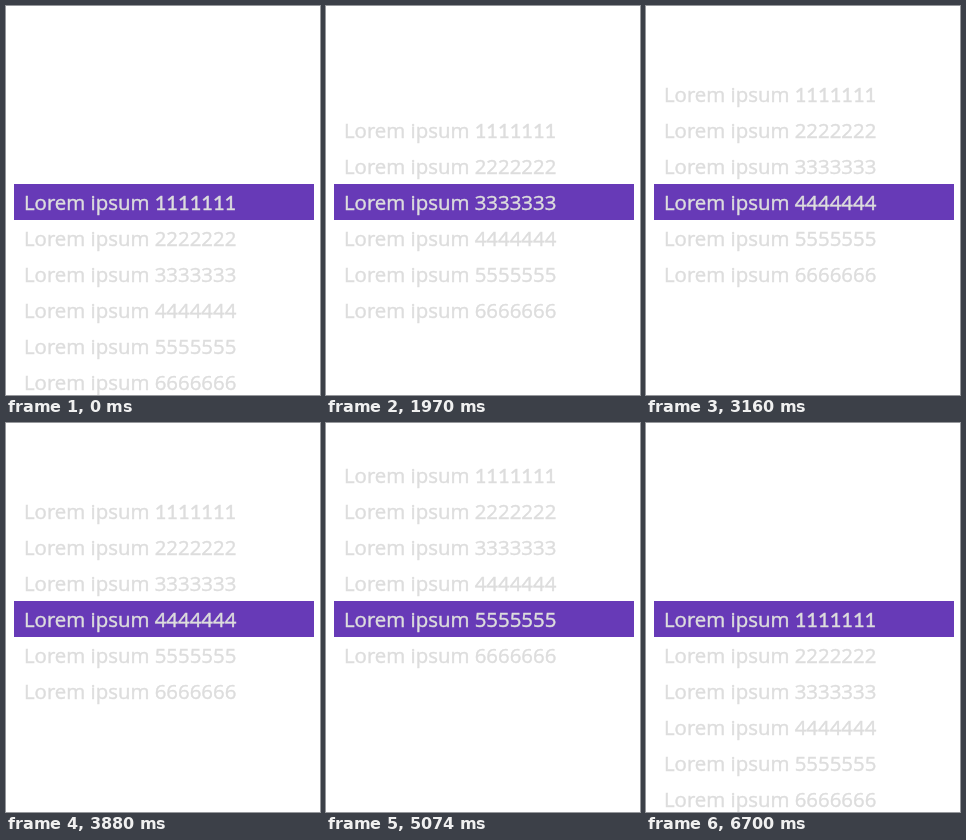
An HTML page that plays this animation: 314x389 px, repeating every 7.04 s.

```html
<!DOCTYPE html>
<html lang="la">
<head>
<meta charset="utf-8">
<title>Lorem ipsum list</title>
<style>
  html, body {
    margin: 0;
    width: 100%;
    height: 100%;
    overflow: hidden;
    background: #fff;
  }
  .stage {
    position: relative;
    width: 314px;
    height: 389px;
    overflow: hidden;
  }
  .bar {
    position: absolute;
    left: 8px;
    top: 178px;
    width: 300px;
    height: 36px;
    background: #673ab7;
  }
  .list {
    position: absolute;
    left: 18px;
    top: 178px;
    margin: 0;
    padding: 0;
    list-style: none;
    color: #ddd;
    font: 20.4px/36px "Open Sans", "Noto Sans", sans-serif;
    -webkit-text-stroke: 0.45px currentColor; /* a touch heavier than regular */
    white-space: nowrap;
    animation: pick 7040ms step-end infinite;
  }
  .list li { height: 36px; }
  /* ones with a foot */
  .ones {
    font: 20.1px/0 Lato, sans-serif;
  }
  @keyframes pick {
    0%      { top: 178px; }
    11.221% { top: 142px; }
    27.982% { top: 106px; }
    44.886% { top: 70px; }
    61.931% { top: 34px; }
    78.835% { top: -2px; }
    95.170%, 100% { top: 178px; }
  }
</style>
</head>
<body>
<div class="stage">
  <div class="bar"></div>
  <ul class="list">
    <li>Lorem ipsum <span class="ones">1111111</span></li>
    <li>Lorem ipsum 2222222</li>
    <li>Lorem ipsum 3333333</li>
    <li>Lorem ipsum 4444444</li>
    <li>Lorem ipsum 5555555</li>
    <li>Lorem ipsum 6666666</li>
  </ul>
</div>
</body>
</html>
```
